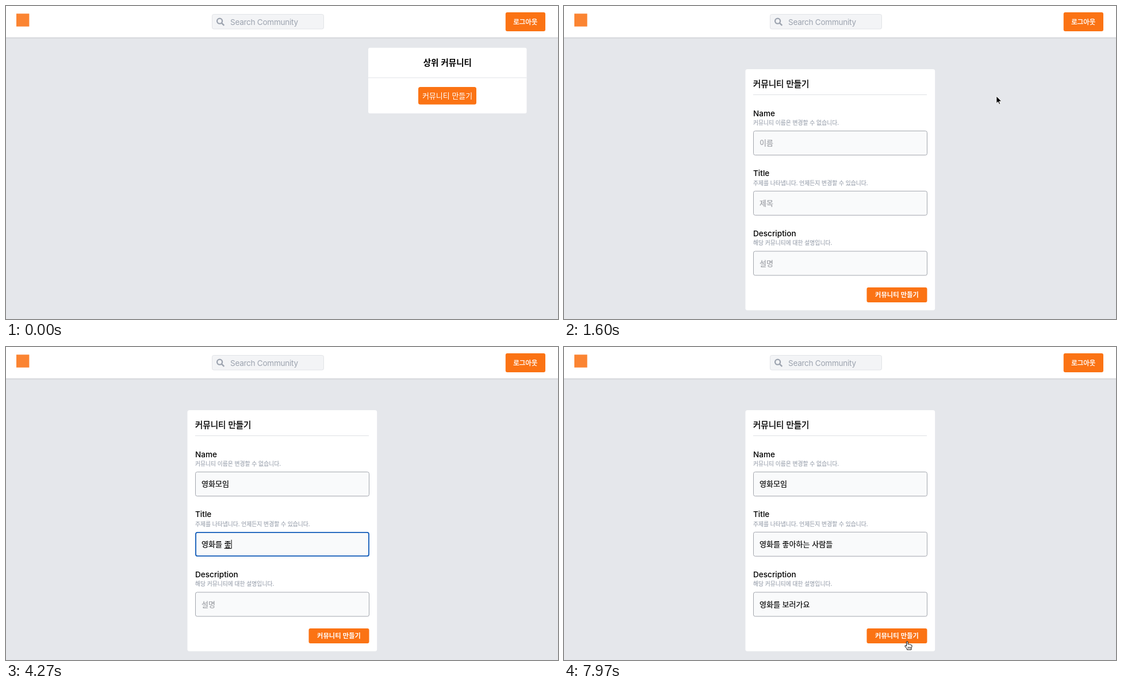
Animation, 960 px wide and 545 px high, one loop 8000 ms. Source, as an HTML page:

```html
<!DOCTYPE html>
<html lang="ko">
<head>
<meta charset="utf-8">
<title>커뮤니티 만들기</title>
<style>
  html, body { margin: 0; height: 100%; overflow: hidden; background: #e5e7eb; }
  svg { display: block; width: 100vw; height: 100vh; }
  text { fill: currentColor; font-family: "Noto Sans CJK KR", "Noto Sans CJK JP", sans-serif; white-space: pre; }
  .latin { font-family: Inter, Roboto, sans-serif; font-size: 13.6px; }
  .mid { text-anchor: middle; }
  .white { color: #fff; fill: #fff; }
  .gray { color: #9ca3af; }
  .orange { fill: #fb7314; }
  .firm { stroke: currentColor; stroke-width: .4; }
  .entry { font-size: 13.04px; stroke: currentColor; stroke-width: .18; }
  .hint { font-size: 9.8px; stroke: currentColor; stroke-width: .15; }
  #beam { fill: none; stroke: #000; stroke-width: 1.1; }
  #beam .halo { stroke: #fff; stroke-width: 2.4; stroke-opacity: .8; }
</style>
</head>
<body>
<svg viewBox="0 0 960 545">
  <rect width="960" height="545" fill="#e5e7eb"/>
  <rect y="55" width="960" height="2" fill="#dcdee2"/>
  <rect y="54.5" width="960" height="1" fill="#cfd1d6"/>
  <rect width="960" height="54.5" class="white"/>
  <rect x="18" y="13.3" width="22.4" height="22.4" fill="#fb8432"/>
  <rect x="358.5" y="14.5" width="194" height="25.5" rx="3" fill="#f3f4f6" stroke="#e1e3e7"/>
  <g fill="none" stroke="#9ca3af" stroke-width="2.3">
    <circle cx="371.6" cy="26.2" r="4.5"/>
    <path d="M375 29.6L379.3 33.9"/>
  </g>
  <text x="390" y="32.6" class="latin gray" letter-spacing="-.3">Search Community</text>
  <rect x="868.8" y="11" width="69.2" height="33" rx="3" class="orange"/>
  <text x="903.3" y="31.6" class="mid white firm" font-size="11.4">로그아웃</text>

  <g id="home">
    <rect x="630" y="72.7" width="275.5" height="114.3" rx="3" class="white"/>
    <rect x="630" y="124.3" width="275.5" height="1.2" fill="#e5e7eb"/>
    <text x="767.8" y="103.7" class="mid" font-size="14.5" font-weight="600">상위 커뮤니티</text>
    <rect x="717" y="141" width="101" height="30.5" rx="3.5" class="orange"/>
    <text x="767.6" y="160.8" class="mid white" font-size="13">커뮤니티 만들기</text>
  </g>

  <g id="form">
    <rect x="315.5" y="110" width="329.7" height="419.7" rx="3.5" class="white"/>
    <text x="329" y="140.5" class="firm" font-size="14.5">커뮤니티 만들기</text>
    <rect x="329" y="154" width="302" height="1" fill="#dfe1e5"/>
    <g id="fields"></g>
    <rect x="526.5" y="490" width="105" height="26" rx="3" class="orange"/>
    <text x="579" y="507" class="mid white" font-size="11.3" font-weight="600">커뮤니티 만들기</text>
  </g>

  <g id="cursor">
    <path id="arrow" d="M0 0V12.5L2.9 9.8 4.8 14.2 6.8 13.4 4.9 9.1H8.9Z" stroke="#fff" stroke-width=".9"/>
    <g id="beam">
      <path id="bar" class="halo" d="M-3-7Q0-7 0-5 0-7 3-7M0-5V5M-3 7Q0 7 0 5 0 7 3 7M-1.6 3H1.6"/>
      <path d="M-3-7Q0-7 0-5 0-7 3-7M0-5V5M-3 7Q0 7 0 5 0 7 3 7M-1.6 3H1.6"/>
    </g>
    <g id="hand" fill="#fff" stroke="#000" stroke-linejoin="round">
      <path d="M-1.4 1Q-1.4-.4-.2-.4T1.1 1V5Q1.6 4.2 2.6 4.4 3.5 4.5 3.6 5.2 4.4 4.6 5.3 5 6 5.3 6 6 7 5.6 7.7 6.2 8.3 6.8 8 8.5L7 11.5V14H-.5V12.5L-4 8.2Q-4.4 7-3.4 6.8-2.5 6.7-1.4 8Z"/>
      <path d="M1.4 9V12M3.4 9V12M5.4 9V12" stroke-width=".8"/>
    </g>
  </g>
</svg>
<script>
const LOOP = 8000, FORM_AT = 1600, FIELD_STEP = 104.7;
const $ = id => document.getElementById(id);

// stages: what the input method shows while each syllable is composed.
// The first `warmup` strokes start at `first`; the rest follow from `resume`, one per `pace` ms.
const fields = [
  { label: 'Name', hint: '커뮤니티 이름은 변경할 수 없습니다.', empty: '이름',
    value: '영화모임', stages: 'ㅇ여영/ㅎ호화홤/모몽/이임',
    focus: [2230, 3270], first: 2370, warmup: 1, resume: 2600, pace: 58 },
  { label: 'Title', hint: '주제를 나타냅니다. 언제든지 변경할 수 있습니다.', empty: '제목',
    value: '영화를 좋아하는 사람들', stages: 'ㅇ여영/ㅎ호화활/르를/ /ㅈ조좋/ㅇ아앟/하한/느는/ /ㅅ사살/라람/ㄷ드들',
    focus: [3270, 5300], first: 3530, warmup: 2, resume: 3800, pace: 47 },
  { label: 'Description', hint: '해당 커뮤니티에 대한 설명입니다.', empty: '설명',
    value: '영화를 보러가요', stages: 'ㅇ여영/ㅎ호화활/르를/ /ㅂ보볼/러럭/가강/요',
    focus: [5300, 7700], first: 5900, warmup: 0, resume: 5900, pace: 55, blink: [5630, 5900] }
];

// Eased pointer moves; `via` bends the path
const moves = [
  { from: 70, to: 130, end: [725, 305] },
  { from: 270, to: 700, end: [720, 219], via: [840, 65] },
  { from: 870, to: 1100, end: [752, 157] },
  { from: 1870, to: 2230, end: [494, 220] },
  { from: 2370, to: 2400, end: [530, 283] },
  { from: 7170, to: 7640, end: [597, 513] }
];
const entry = [729, 394], shown = [[70, 2370], [7170, LOOP]];

const within = (t, [from, to]) => t >= from && t < to;
const show = (el, on) => el.setAttribute('display', on ? 'inline' : 'none');
const place = (el, attrs) => { for (const k in attrs) el.setAttribute(k, attrs[k]); };

$('fields').innerHTML = fields.map((f, i) => `
  <g transform="translate(0 ${i * FIELD_STEP})">
    <text x="329" y="191.8" class="latin" font-weight="500">${f.label}</text>
    <text x="329" y="207" class="hint gray">${f.hint}</text>
    <rect class="box" fill="#f9fafb"/>
    <text x="340" y="243.2" class="entry"></text>
    <rect class="mark" y="245.3" height="1.2"/>
    <rect class="caret" y="231" width="1" height="15.5"/>
  </g>`).join('');

fields.forEach((f, i) => {
  const g = $('fields').children[i];
  for (const name of ['box', 'entry', 'mark', 'caret']) f[name] = g.querySelector('.' + name);
  f.steps = f.stages.split('/').flatMap((s, n) => [...s].map(c => [f.value.slice(0, n), c]));
});

function strokes(f, t) {
  const since = (start, pace) => 1 + Math.floor((t - start + 1) / pace);
  if (t < f.first) return 0;
  if (t < f.resume) return Math.min(f.warmup, since(f.first, 100));
  return Math.min(f.steps.length, f.warmup + since(f.resume, f.pace));
}

function drawField(f, t) {
  const focused = within(t, f.focus), count = strokes(f, t);
  const [done, last] = count ? f.steps[count - 1] : ['', ''];
  f.entry.textContent = count ? done + last : f.empty;
  f.entry.setAttribute('color', count ? '#000' : '#9c9ea4');
  place(f.box, focused
    ? { x: 330, y: 218.2, width: 301, height: 41, rx: 3, stroke: '#0f5ab8', 'stroke-width': 1.8 }
    : { x: 329.5, y: 217.6, width: 302, height: 42, rx: 3, stroke: '#a3a6ae', 'stroke-width': 1 });
  const end = count ? f.entry.getComputedTextLength() : 0;
  const start = done ? f.entry.getSubStringLength(0, done.length) : 0;
  place(f.caret, { x: 340 + end });
  place(f.mark, { x: 340 + start, width: end - start });
  show(f.caret, focused && !(f.blink && within(t, f.blink)));
  show(f.mark, focused && last.trim());
}

function pointerAt(t) {
  const i = moves.findLastIndex(m => t >= m.from), { from, to, end, via } = moves[i];
  const begin = i ? moves[i - 1].end : entry;
  const p = Math.min(1, (t - from) / (to - from)), u = p * p * (3 - 2 * p);
  return end.map((e, k) => {
    const b = begin[k], c = via ? via[k] : (b + e) / 2;
    return b * (1 - u) ** 2 + 2 * c * u * (1 - u) + e * u * u;
  });
}

function pointerKind(x, y, onForm) {
  if (!onForm) return within(x, [717, 818]) && within(y, [141, 171]) ? 'beam' : 'arrow';
  if (!within(x, [329, 631])) return 'arrow';
  if (within(y, [490, 516])) return 'hand';
  return within(y, [217, 365]) || within(y, [427, 469]) ? 'beam' : 'arrow';
}

function drawPointer(t, onForm) {
  const visible = shown.some(span => within(t, span));
  show($('cursor'), visible);
  if (!visible) return;
  const [x, y] = pointerAt(t), kind = pointerKind(x, y, onForm);
  $('cursor').setAttribute('transform', `translate(${x} ${y})`);
  for (const id of ['arrow', 'beam', 'hand']) show($(id), id === kind);
}

function draw() {
  const t = performance.now() % LOOP, onForm = t >= FORM_AT;
  show($('home'), !onForm);
  show($('form'), onForm);
  if (onForm) fields.forEach(f => drawField(f, t));
  drawPointer(t, onForm);
  requestAnimationFrame(draw);
}
draw();
</script>
</body>
</html>
```
